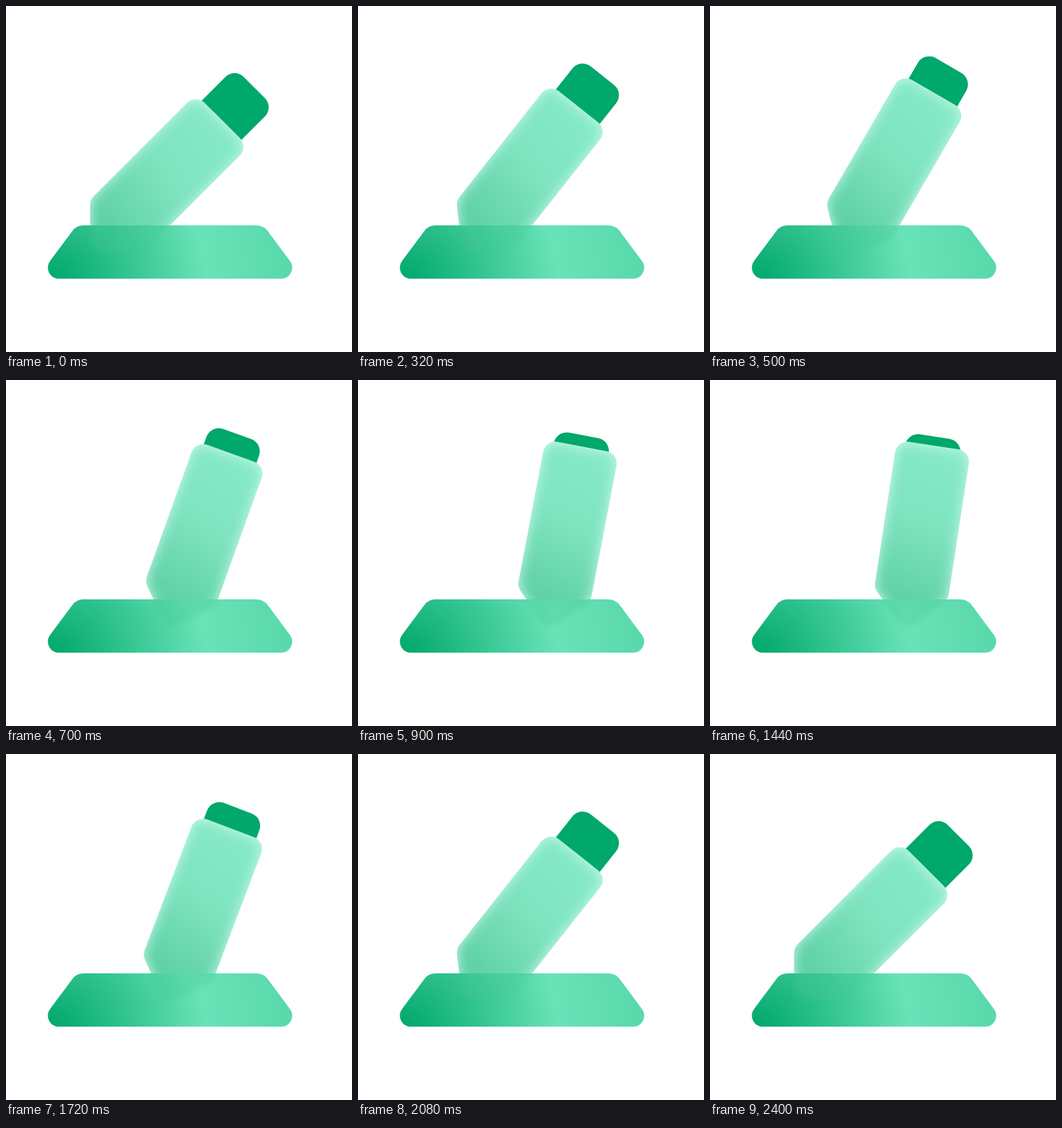
An HTML page that plays this animation: 500x500 px, repeating every 2420 ms.

```html
<!DOCTYPE html>
<html lang="en">
<head>
<meta charset="utf-8">
<title>Highlighter</title>
<style>
  html, body { margin: 0; width: 100%; height: 100%; overflow: hidden; background: #fff; }
  svg { display: block; width: 100vw; height: 100vh; }
</style>
</head>
<body>
<svg viewBox="0 0 500 500">
  <defs>
    <radialGradient id="baseFill" gradientUnits="userSpaceOnUse" cx="65" cy="400" r="350">
      <stop offset=".03" stop-color="#03a96d"/>
      <stop offset=".64" stop-color="#69e3b8"/>
      <stop offset="1" stop-color="#58d8aa"/>
    </radialGradient>
    <linearGradient id="bodyFill" gradientUnits="userSpaceOnUse" x1="30" y1="-270" x2="-30" y2="-40">
      <stop offset="0" stop-color="#86eac8"/>
      <stop offset=".5" stop-color="#7ee3bf"/>
      <stop offset="1" stop-color="#5dd0a4"/>
    </linearGradient>
    <filter id="soft"><feGaussianBlur stdDeviation="3"/></filter>
    <filter id="glow" x="-30%" y="-30%" width="160%" height="160%"><feGaussianBlur stdDeviation="9"/></filter>
    <path id="base" d="M78 394H397A16 16 0 0 0 410 368L378 325Q372 317 361 317H112Q102 317 96 325L64 368A16 16 0 0 0 78 394Z"/>
    <path id="body" d="M-36-270H36A18 18 0 0 1 54-252V-62Q54-54 48.3-48.3L12.7-12.7A18 18 0 0 1-12.7-12.7L-48.3-48.3Q-54-54-54-62V-252A18 18 0 0 1-36-270Z"/>
    <clipPath id="baseClip"><use href="#base"/></clipPath>
    <clipPath id="bodyClip"><use href="#body"/></clipPath>
  </defs>
  <g class="pen">
    <rect id="cap" x="-41.2" width="80.8" height="90" rx="19" fill="#00a86b"/>
    <use href="#body" fill="#d0f9eb"/>
    <g clip-path="url(#bodyClip)">
      <use href="#body" fill="url(#bodyFill)" filter="url(#glow)"/>
    </g>
  </g>
  <use href="#base" fill="url(#baseFill)"/>
  <g clip-path="url(#baseClip)">
    <g class="pen"><use href="#body" fill="#45c594" opacity=".28" filter="url(#soft)"/></g>
  </g>
</svg>
<script>
  const LOOP = 2420, HALF = 1200, STEP = 20;
  const pens = document.querySelectorAll('.pen');
  const cap = document.getElementById('cap');
  const mix = (a, b, p) => a + (b - a) * p;

  function draw(now) {
    const t = Math.floor((now % LOOP) / STEP) * STEP;
    const p = (1 - Math.cos(Math.PI * t / HALF)) / 2;
    // The tip slides along the base while the pen turns upright and the cap closes.
    const pose = `translate(${mix(121.5, 299.5, p)} ${mix(356.3, 362.3, p)}) rotate(${mix(45, 4.9, p)})`;
    pens.forEach(pen => pen.setAttribute('transform', pose));
    cap.setAttribute('y', -270 - mix(66.5, 7.6, p));
  }

  const start = performance.now();
  function tick() {
    draw(performance.now() - start);
    requestAnimationFrame(tick);
  }
  tick();
</script>
</body>
</html>
```
